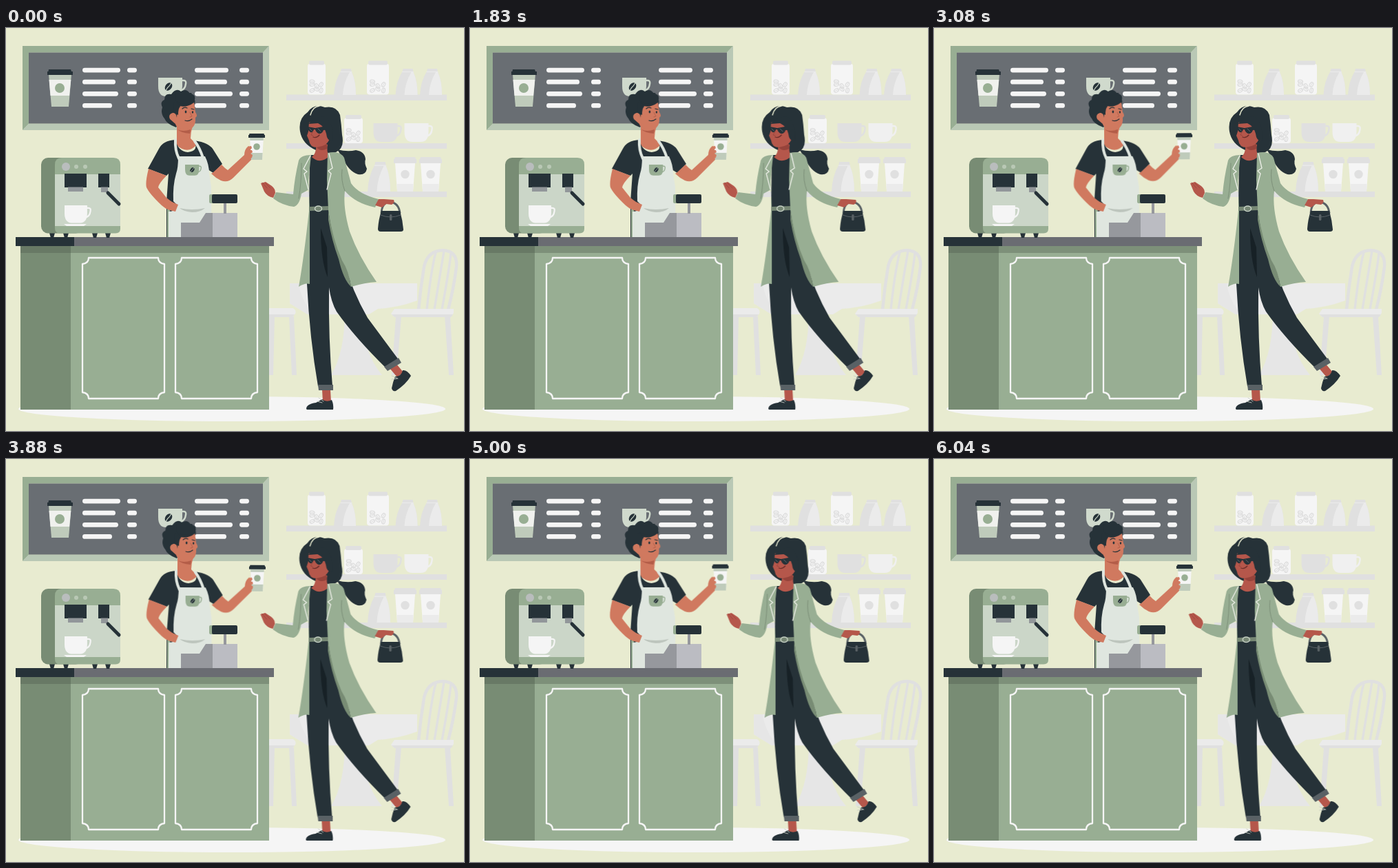
These frames come from a looping animation (665 px wide and 584 px high, 6080 ms). An HTML page:

```html
<!DOCTYPE html>
<html lang="en">
<head>
<meta charset="utf-8">
<title>Coffee counter</title>
<style>
html, body { margin: 0; width: 100%; height: 100%; overflow: hidden; background: #e8ebd0; }
svg { display: block; width: 100vw; height: 100vh; }
.ink { fill: #263238; }
.green { fill: #98ae93; }
.moss { fill: #788c74; }
.pale { fill: #cbd6c8; }
.white { fill: #f5f5f5; }
.fog { fill: #e0e0e0; }
.mist { fill: #ebebeb; }
.him { fill: #d0795f; }
.her { fill: #b5574b; }
.line { fill: none; stroke-linecap: round; stroke-linejoin: round; }
#barista { transform-origin: 250px 303px; }
</style>
</head>
<body>
<svg viewBox="0 0 665 584" preserveAspectRatio="none">
<defs>
  <g id="bean"><ellipse rx="4.6" ry="6.4" transform="rotate(38)"/><path class="line" d="M3.6-5Q1.5-1 0 0T-3.6 5" stroke="#cbd6c8" stroke-width="1.1"/></g>
  <g id="pouch">
    <path class="fog" d="M0 38Q1 18 10 4L11 0H25L26 5Q32 18 32 38Z"/>
    <path class="mist" d="M13 38Q14 20 23 5L26 5Q32 18 32 38Z"/>
    <path class="line" d="M10 4.500H26" stroke="#ebebeb"/>
  </g>
  <g id="shelfCup">
    <path class="fog" d="M2 0H31L32 3H33V9H0V3H1Z"/>
    <path class="white" d="M2 9H31L28 50H5Z"/>
    <path class="mist" d="M4.500 39H28.500L28 50H5Z"/>
    <circle class="fog" cx="16.500" cy="25" r="6.200"/>
  </g>
  <g id="mug">
    <path d="M0 0H35V12Q35 27 24 27H11Q0 27 0 12Z"/>
    <path class="line" d="M34 4H37Q41 4 40 9Q39 18 31 19" stroke="currentColor" stroke-width="2.400"/>
  </g>
  <g id="panel"><path class="line" d="M9 0H110Q110 8 119 9V195Q110 196 110 204H9Q9 196 0 195V9Q9 8 9 0Z" stroke="#f5f5f5" stroke-width="2.300"/></g>
</defs>

<ellipse class="white" cx="328" cy="552" rx="310" ry="18"/>

<g id="shelves">
  <path class="fog" d="M407 96.500H640V105H407ZM407 167H640V175H407ZM407 237H640V245H407Z"/>
  <use href="#pouch" x="476" y="59"/><use href="#pouch" x="565.500" y="59"/><use href="#pouch" x="601" y="59"/>
  <use href="#pouch" transform="translate(525 194) scale(1.030 1.130)"/>
  <use href="#mug" x="533.500" y="138" fill="#e0e0e0" color="#e0e0e0"/>
  <use href="#mug" x="578.500" y="138" fill="#f0f0f0" color="#f0f0f0"/>
  <use href="#shelfCup" x="563" y="187"/><use href="#shelfCup" x="600" y="187"/>
</g>

<g id="seating">
  <path fill="#e6e6e6" d="M492 410H516Q518 470 546 503H472Q492 470 492 410Z"/>
  <path class="mist" d="M412 370H597V395Q570 405 540 407L527 415H438L412 399Z"/>
  <path fill="#e6e6e6" d="M412 370H425Q428 394 446 415H438L412 399Z"/>
  <path class="fog" d="M382 418H390L388 503H382ZM411 418H418L422 503H415ZM566 418H574L567 503H560ZM637 418H645L650 503H643Z"/>
  <path class="mist" d="M382 406H417Q422 409 420 414L416 419H382Z"/>
  <path class="fog" d="M382 415H419L416 419H382Z"/>
  <g class="line" stroke="#e0e0e0" stroke-width="4.500">
    <path d="M599 408Q602 376 607 346Q612 323 634 322Q656 323 654 346Q650 378 642 408"/>
    <path d="M611 408Q617 352 624 325M622 408Q631 352 636 323M633 408Q643 352 646 327" stroke-width="3.400"/>
  </g>
  <path class="mist" d="M564 407H650V413L646 419H564L559 414Z"/>
  <path class="fog" d="M560 415H649L646 419H564Z"/>
</g>

<g id="board">
  <path class="green" d="M24 26H382L373 35.500H33V139L24 148Z"/>
  <path fill="#b9c8b5" d="M382 26V148H24L33 138.500H373V35.500Z"/>
  <path fill="#696e73" d="M33 35.500H373V138.500H33Z"/>
  <path fill="#bfcbbb" d="M62 67H95L91 114H66Z"/>
  <path fill="#f0f1ee" d="M62.500 75H94.300L92 98H64.500Z"/>
  <circle class="green" cx="78" cy="87" r="7"/>
  <path class="ink" d="M62 60H94L95 63H97V68H60V63H61.500Z"/>
  <use href="#mug" x="221" y="72" fill="#d0dacd" color="#d0dacd"/>
  <use href="#bean" class="ink" x="236" y="85"/>
</g>

<g id="barista">
  <path class="him" d="M248 138L271 142Q268 151 268 160L277 169Q264 184 248 170Z"/>
  <path class="ink" d="M246 162Q228 163 222 175L206 204L233 214L236 211L233 252V303H296L293 205L301 210L314 197L302 178Q296 166 273 163Q281 178 264 180Q250 179 246 162Z"/>
  <path class="him" d="M207 204L233 214Q222 225 221 231L233 246Q240 252 249 257L246 265Q232 263 226 257Q208 240 204 231Q202 224 207 204Z"/>
  <path class="him" d="M301 209L313 198L318 203L322 206L346 184Q346 176 352 171L357 174V190L330 217Q322 225 312 221Q304 217 298 211Z"/>
  <path class="green" d="M234 262H238V303H234Z"/>
  <path fill="#dfe6df" d="M250 186H289Q295 198 295 211L298 230Q298 260 299 303H236V266Q246 266 249 257L243 251Q242 228 247 211Q250 203 250 186Z"/>
  <path class="line" d="M251 189Q245 177 246 162M286 188Q281 173 274 164" stroke="#dfe6df" stroke-width="4"/>
  <path fill="#bdc5bd" d="M252 261Q270 265 289 261Q282 267 270 267Q258 266 252 261Z"/>
  <path class="him" d="M228 250Q236 248 241 252L250 256L246 266Q238 265 231 261Z"/>
  <g transform="translate(260 198) scale(.58)"><use href="#mug" class="green" color="#98ae93"/><use href="#bean" class="ink" x="18" y="13"/></g>
  <path class="ink" d="M247 144Q233 139 230 131Q224 124 227 115Q223 107 230 104Q230 94 240 96Q247 86 254 92Q262 87 267 95Q276 96 274 104Q276 110 270 112L258 124Z"/>
  <path class="him" d="M249 112Q261 117 273 108L275 122Q279 127 275 130Q276 146 263 147Q248 147 246 139L238 132Q235 125 242 123Q247 122 248 130Z"/>
  <path class="ink" d="M247 106Q262 115 274 104L269 94H246Z"/>
  <path class="ink" d="M243 109Q251 107 253 114Q250 116 250 126L244 123Z"/>
  <ellipse class="ink" cx="261" cy="121.500" rx="1.300" ry="1.900"/><ellipse class="ink" cx="271" cy="122" rx="1.200" ry="1.800"/>
  <path class="line" d="M256 117Q259 114 263 116M269 117L273 118M260 134Q265 136 270 132" stroke="#263238" stroke-width="1.200"/>
  <path class="line" d="M267 122L270 128L267 129" stroke="#b35d48" stroke-width=".9"/>
  <path fill="#b35d48" d="M249 147Q257 151 268 147L267 153Q254 152 249 147Z"/>
  <path class="white" d="M354 158H374L372 191H356Z"/>
  <path fill="#bfcbbb" d="M354 158H374L373.700 163H354.300ZM355.400 181H372.600L372 191H356Z"/>
  <circle class="green" cx="364" cy="172" r="4.800"/>
  <path class="ink" d="M353.500 153H374.500L375 155H376V159H352V155H353Z"/>
  <path class="him" d="M348 177Q350 171 356 171L357 174L354 177H357L358 180L355 182L358 184L357 188L349 191Z"/>
</g>

<g id="counter">
  <path class="moss" d="M21 316H95V553H21Z"/>
  <path class="green" d="M94 316H382V553H94Z"/>
  <path fill="#687965" d="M21 316H94V326H21Z"/>
  <path fill="#7d9079" d="M94 316H382V326H94Z"/>
  <path class="ink" d="M14 303H100V316H14Z"/>
  <path fill="#6a6c72" d="M99 303H389V316H99Z"/>
  <use href="#panel" x="111" y="333"/><use href="#panel" x="246" y="333"/>
</g>

<g id="till">
  <path fill="#96989d" d="M254 282H281L290 268H300V303H254Z"/>
  <path fill="#bbbcc2" d="M300 268H336V303H300Z"/>
  <path fill="#96989d" d="M316 253H320V269H316Z"/>
  <rect class="green" x="295" y="241" width="12" height="13" rx="2"/>
  <rect class="ink" x="299" y="241" width="37" height="13" rx="2"/>
</g>

<g id="machine">
  <path class="ink" d="M63 297H71L69 304H65ZM83 297H91L89 304H85ZM125 297H133L131 304H127ZM144 297H152L150 304H146Z"/>
  <rect class="moss" x="51" y="188" width="60" height="109.500" rx="10"/>
  <path class="green" d="M81 188H156Q166 188 166 198V291Q166 297.500 159 297.500H77Q71 297 71 290V198Q71 188 81 188Z"/>
  <path class="pale" d="M71 212H166V287H71Z"/>
  <circle fill="#b9bdbd" cx="87" cy="201" r="6"/><circle fill="#b9c8b5" cx="102" cy="201" r="3"/><circle fill="#b9c8b5" cx="115" cy="201" r="3"/>
  <path class="ink" d="M85 211H117V231H85ZM134 211H150V231H134Z"/>
  <path fill="#92979a" d="M90 230.500H112V237H90ZM138 230.500H148V238H138Z"/>
  <path class="line" d="M148 239L164 255" stroke="#263238" stroke-width="5"/>
  <use href="#mug" transform="translate(85 257) scale(.94)" fill="#f5f5f5" color="#f5f5f5"/>
  <path class="white" d="M84 284H117L113 287H88Z"/>
</g>

<g id="guest">
  <path class="ink" d="M481 176Q496 180 508 177Q521 179 522 190Q520 196 524 204Q522 214 511 212Q498 208 489 189Z"/>
  <path class="ink" d="M427 150Q424 131 438 122Q447 109 463 115Q480 112 485 126Q487 140 488 155Q492 174 479 180Q464 183 450 177Q430 168 427 150Z"/>
  <path class="line" d="M442 126Q445 114 455 113" stroke="#e8ebd0" stroke-width="1.400"/>

  <path class="ink" d="M441 264H469Q480 304 489 334Q503 382 525 420L571 482L552 493Q507 449 480 411Q472 397 469 376Q468 450 474 519H453Q441 450 437 371Z"/>
  <path fill="#172126" d="M457 290L466 318L467 361Q457 338 457 290Z"/>
  <path class="her" d="M459 524H471L472 542H460ZM557 493L567 487L577 499L568 506Z"/>
  <path fill="#596165" d="M453 517H475V525H454ZM549 491L570 478L574 485L554 497Z"/>
  <path class="ink" d="M436 552Q436 545 450 543L459 538Q465 543 473 539Q476 546 475 553H437Z"/>
  <path class="ink" d="M560 522Q562 512 565 505Q574 505 576 496Q582 495 588 504Q581 516 566 526Q561 527 560 522Z"/>
  <path class="line" d="M452 541L459 543M454 536L461 541M560 509L568 508M560 504L569 508" stroke="#c9cec6" stroke-width=".9"/>

  <path class="ink" d="M441 184H471L469 264H440Z"/>
  <path class="her" d="M450 163L467 169Q465 178 469 186Q456 198 444 187Q452 181 450 163Z"/>
  <path class="her" d="M391 239L388 246Q379 244 375 237L370 225L377 223L386 229Q391 233 391 239Z"/>
  <path class="line" d="M372 224L379 232M377 225L384 232" stroke="#96433b" stroke-width=".7"/>
  <path class="green" d="M443 184Q428 184 425 192Q419 217 417 241L392 238L388 247Q401 257 418 259Q426 257 429 240L440 234V264Q433 330 425 375Q434 369 441 371L441 262L439 222Z"/>
  <path class="green" d="M467 181Q485 177 491 188L501 225Q512 241 541 248L536 260Q507 254 492 236Q489 260 499 295Q512 331 538 368Q521 369 501 375Q498 351 485 336Q474 308 468 264L466 220Z"/>
  <path class="moss" d="M468 264Q474 306 488 337Q498 352 501 375Q490 365 483 335Q473 308 468 278Z"/>
  <path class="line" d="M429 196Q429 225 425 247M488 205Q486 221 492 236" stroke="#7d9079"/>
  <path class="line" d="M442 185L432 204L437 208L433 211L439 234M469 182L474 203L468 207L472 211L466 234" stroke="#eef0e9" stroke-width="1.300"/>
  <path fill="#768774" d="M440 259L468 258V264L440 265Z"/>
  <ellipse class="line" cx="453.500" cy="261.700" rx="5" ry="3.700" stroke="#cbd6c8" stroke-width="1.500"/>

  <path class="her" d="M440 137Q455 130 468 140L470 160Q466 172 452 173Q441 173 440 163L437 156L439 150Z"/>
  <path class="ink" d="M439 139Q449 126 464 129Q477 141 474 164Q466 164 465 153Q463 143 453 138Z"/>
  <path class="ink" d="M438 143L449 145L460 143L471 144V147L461 148Q459 154 454 153Q450 151 449 147L447 147Q446 152 442 151Q438 148 438 143Z"/>
  <path class="line" d="M441 146L444 149M453 146L457 150" stroke="#66747b" stroke-width=".8"/>
  <path class="line" d="M446 158Q451 160 455 155" stroke="#6d2f2b" stroke-width="1.300"/>
  <path class="line" d="M446 149L443 155L446 156" stroke="#96433b" stroke-width=".8"/>
  <path fill="#96433b" d="M451 173Q459 172 466 168L466 175Q457 180 451 173Z"/>

  <path class="line" d="M545 268Q546 253 557 252Q570 253 572 268" stroke="#596165" stroke-width="2.800"/>
  <path class="her" d="M541 248L549 248L563 249Q565 253 560 256L552 255L546 260L536 257Z"/>
  <path class="ink" d="M545 265H572Q576 279 577 292Q577 295 573 295H544Q540 295 540 291Q541 277 545 265Z"/>
  <path class="line" d="M544 271Q558 277 573 271" stroke="#596165"/>
  <rect x="557" y="270" width="3.400" height="9" rx="1.600" fill="#596165"/>
</g>
</svg>
<script>
const LOOP = 6080;
const $ = id => document.getElementById(id);

function add(parent, tag, attrs) {
  const el = document.createElementNS('http://www.w3.org/2000/svg', tag);
  for (const key in attrs) el.setAttribute(key, attrs[key]);
  return parent.appendChild(el);
}

// Menu lines: [long left, long right] per row
[[55, 49], [48, 47], [52, 55], [43, 46]].forEach(([left, right], row) => {
  const bar = (x, width) => add($('board'), 'rect',
    { x, y: 57.7 + row * 17.1, width, height: 6.8, rx: 3.4, class: 'white' });
  bar(111, left);
  bar(176, 14);
  bar(274, right);
  bar(339, 14);
});

function jar(x, y, w, h) {
  const g = $('shelves');
  add(g, 'rect', { x, y: y + 4, width: w, height: h - 4, rx: 4, class: 'white' });
  add(g, 'rect', { x: x + 2, y, width: w - 4, height: 6, rx: 2, class: 'fog' });
  for (let i = 0; i < 7; i++) {
    const cx = x + w * (0.25 + 0.25 * (i % 3));
    const cy = y + h - 6 - Math.floor(i / 3) * 6.5 - (i % 2) * 2;
    const spin = `rotate(${i * 67 - 30} ${cx} ${cy})`;
    add(g, 'ellipse', { cx, cy, rx: 3.6, ry: 2.4, transform: spin, fill: 'none', stroke: '#dadada' });
    add(g, 'path', { d: `M${cx - 3} ${cy}h6`, transform: spin, stroke: '#dadada', 'stroke-width': 0.8 });
  }
}
jar(438, 47.5, 26, 49);
jar(524, 47.5, 32, 49);
jar(491, 126, 27, 41);

// Steps are [ms, value]
function sway(id, steps, pose) {
  const frames = steps.map(([ms, v]) => ({ offset: ms / LOOP, transform: pose(v) }));
  $(id).animate(frames, { duration: LOOP, iterations: Infinity }).startTime = 0;
}
sway('barista',
  [[0, 0], [880, 0.95], [1830, -0.05], [2500, -0.6], [3080, -0.35], [3880, 0.38],
   [5000, -0.2], [5400, -0.45], [6080, 0]],
  v => `rotate(${v}deg)`);
sway('guest',
  [[0, 0], [880, -0.6], [1300, 0.4], [1830, -2.8], [2700, 2], [3080, 2], [3880, -0.6],
   [4250, 0.6], [5000, 2.6], [5250, 2.2], [6040, -0.3], [6080, 0]],
  v => `translateX(${v}px)`);
</script>
</body>
</html>
```
